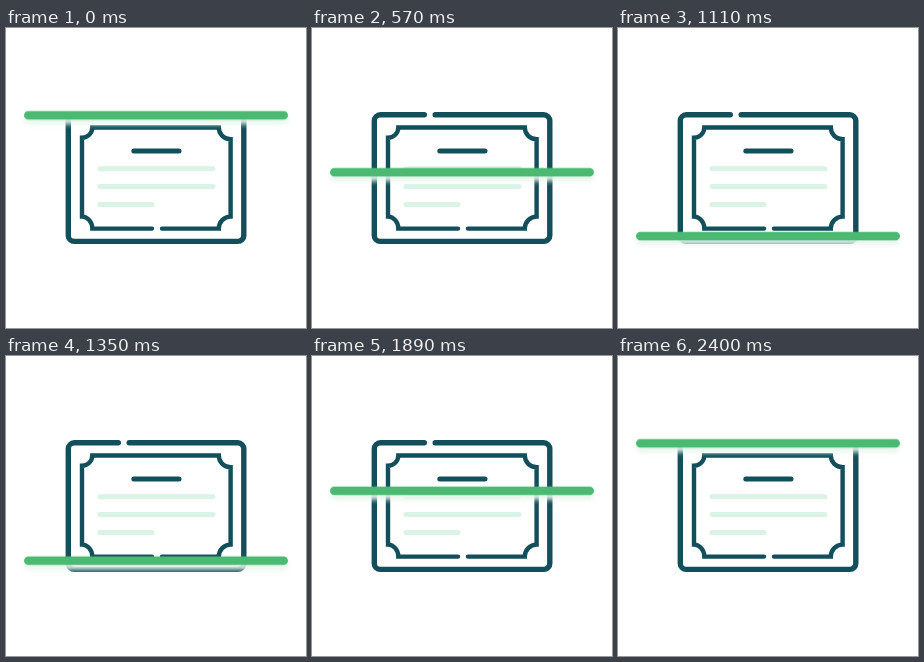
Write an HTML page that moves like this. It is 300 px wide and 300 px high and loops after 2.46 s.

```html
<!DOCTYPE html>
<html lang="en">
<head>
<meta charset="utf-8">
<title>Certificate scan</title>
<style>
  html, body { margin: 0; width: 100%; height: 100%; overflow: hidden; background: #fff; }
  svg { display: block; width: 100%; height: 100%; }
  .ink, .text { fill: none; stroke-linecap: round; }
  .ink { stroke: #124f5a; }
  .text { stroke: #dbf3e6; stroke-width: 5; }
</style>
</head>
<body>
<svg viewBox="0 0 300 300">
  <defs>
    <filter id="soft" filterUnits="userSpaceOnUse" x="0" y="-20" width="300" height="50">
      <feGaussianBlur stdDeviation="2.5"/>
    </filter>
  </defs>

  <!-- certificate -->
  <path class="ink" stroke-width="5.4" d="M112.3 86.8H68.3a6 6 0 0 0-6 6V207.4a6 6 0 0 0 6 6H231.8a6 6 0 0 0 6-6V92.8a6 6 0 0 0-6-6H123.2"/>
  <path class="ink" stroke-width="4.4" d="M146 200.6H86.3A10.3 12 0 0 0 76 188.6V109.8A10.3 10.3 0 0 0 86.3 99.5H212.8A11.8 11.8 0 0 0 224.6 111.3V188.6A11.8 12 0 0 0 212.8 200.6H156"/>
  <path class="ink" stroke-width="5" d="M127.8 123H173"/>
  <path class="text" d="M94 140.8H207M94 158.6H207M94 176.5H146"/>

  <!-- scanner -->
  <g id="bar">
    <rect x="18" y=".2" width="264" height="8.6" rx="4.3" fill="#e6f6ed" filter="url(#soft)"/>
    <rect x="18" y="-4.3" width="264" height="8.6" rx="4.3" fill="#4bb971"/>
  </g>
</svg>
<script>
  const LOOP = 2460, TOP = 87.3, BOTTOM = 210;
  const ease = 'cubic-bezier(.333, 0, .667, 1)';
  const steps = [[0, TOP], [1200, BOTTOM], [2400, TOP], [LOOP, TOP]];

  document.getElementById('bar').animate(
    steps.map(([ms, y]) => ({ offset: ms / LOOP, transform: `translate(0px, ${y}px)`, easing: ease })),
    { duration: LOOP, iterations: Infinity }
  );
</script>
</body>
</html>
```
